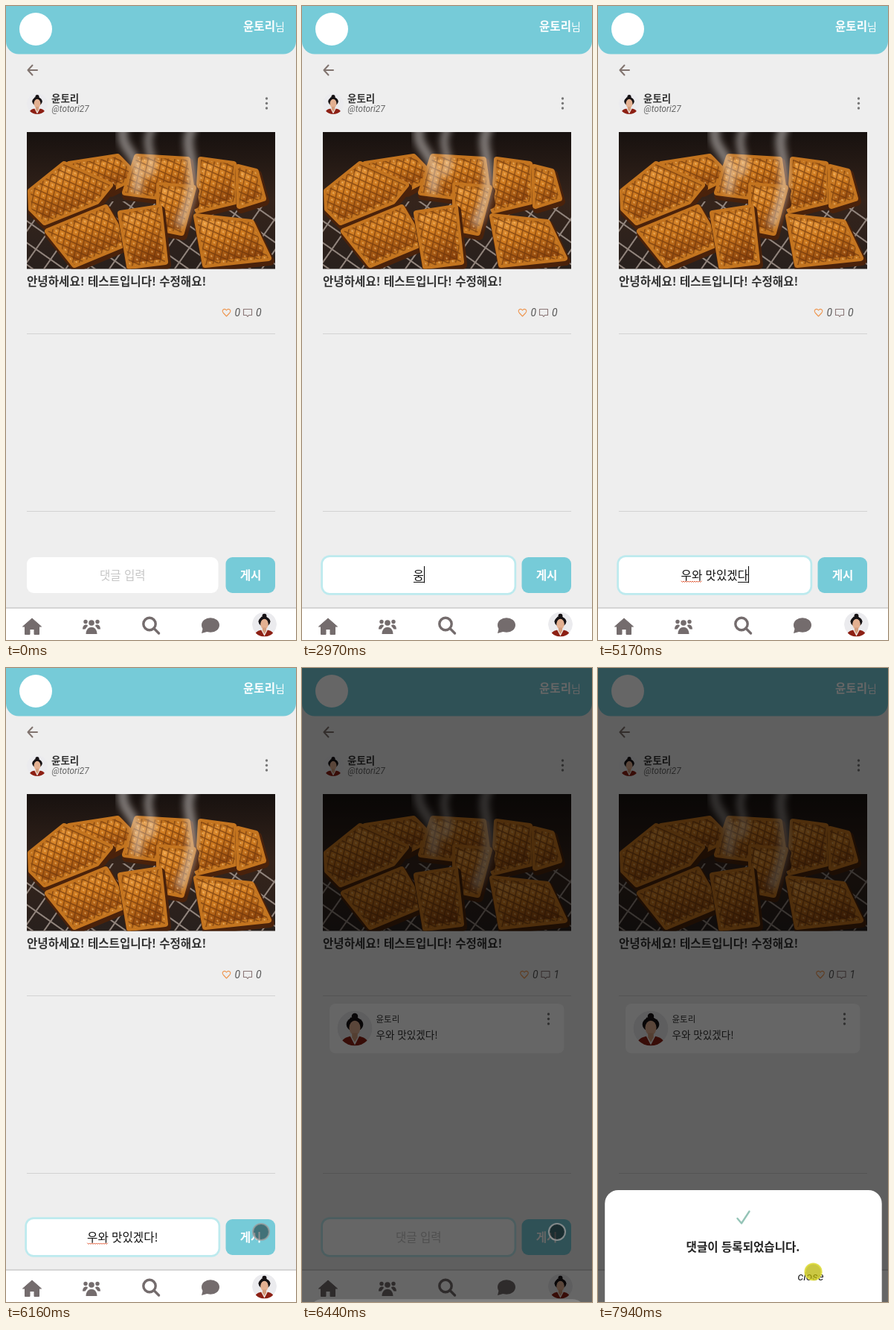
An HTML page that plays this animation: 390x850 px, repeating every 8000 ms.

```html
<!DOCTYPE html>
<html lang="ko">
<head>
<meta charset="utf-8">
<style>
  html, body { margin: 0; width: 100%; height: 100%; overflow: hidden; background: #eee; }
  svg { display: block; width: 100vw; height: 100vh; }
  text { font-family: "Noto Sans CJK KR", "Noto Sans CJK", sans-serif; font-size: 15.6px; fill: #333; white-space: pre; }
  .bold { font-weight: 700; }
  .semi { font-weight: 600; }
  .medium { font-weight: 500; }
  .slim { font-family: Roboto, sans-serif; font-style: italic; font-size: 14px; fill: #555; }
  .mid { text-anchor: middle; }
  .line { fill: none; stroke-linecap: round; stroke-linejoin: round; }
</style>
</head>
<body>
<svg viewBox="0 0 390 850">
  <defs>
    <clipPath id="photoClip"><rect x="28" y="169" width="334" height="183.5"/></clipPath>
    <clipPath id="roundClip"><circle r="50"/></clipPath>
    <linearGradient id="night" x2="0" y2="1">
      <stop stop-color="#17110f"/><stop offset=".5" stop-color="#35241b"/><stop offset="1" stop-color="#28201d"/>
    </linearGradient>
    <linearGradient id="meat" x2=".4" y2="1">
      <stop stop-color="#efa347"/><stop offset=".5" stop-color="#cf7a1e"/><stop offset="1" stop-color="#8b430c"/>
    </linearGradient>
    <pattern id="scores" width="9" height="9" patternUnits="userSpaceOnUse" patternTransform="rotate(24) skewX(12)">
      <path d="M0 0H9M0 0V9" stroke="#65300a" stroke-width="3"/>
      <circle cx="5.5" cy="5" r="1.1" fill="#ffd08a"/>
    </pattern>
    <pattern id="wires" width="24" height="24" patternUnits="userSpaceOnUse" patternTransform="rotate(35)">
      <path d="M0 4H24M4 0V24" stroke="#92857d" stroke-width="2"/>
    </pattern>
    <filter id="soft"><feGaussianBlur stdDeviation="5"/></filter>
    <g id="avatar" clip-path="url(#roundClip)">
      <circle r="50" fill="#ebebee"/>
      <circle cy="-34" r="9" fill="#161214"/>
      <ellipse cy="-11" rx="24" ry="20" fill="#161214"/>
      <ellipse cy="-1" rx="16" ry="21" fill="#e3b091"/>
      <path d="M-16-6C-14-20-4-22 2-25 10-20 16-16 16-6L24-12 8-31H-12L-24-12Z" fill="#161214"/>
      <path d="M-40 50C-38 28-24 26-10 22H10C24 26 38 28 40 50Z" fill="#8d2014"/>
      <path d="M-14 21L0 48 14 21Z" fill="#f4f0ee"/>
      <path d="M-8 14H8V26L0 40-8 26Z" fill="#d49d7d"/>
    </g>
    <g id="kebab" fill="#777">
      <circle cy="-6.5" r="1.7"/><circle r="1.7"/><circle cy="6.5" r="1.7"/>
    </g>
  </defs>

  <rect width="390" height="850" fill="#eee"/>

  <!-- header -->
  <rect y="-30" width="390" height="94.5" rx="17" fill="#76cbd8"/>
  <circle cx="40" cy="31" r="22" fill="#fff"/>
  <text class="bold" x="319" y="33" style="fill:#fff">윤토리<tspan style="font-size:14px;font-weight:400">님</tspan></text>

  <!-- post -->
  <path class="line" d="M42 86H30M35.500 79.500L29.500 86L35.500 92.500" stroke="#81746f" stroke-width="2"/>
  <use href="#avatar" transform="translate(42 131) scale(.28)"/>
  <text class="bold" x="61" y="129" style="font-size:13.5px">윤토리</text>
  <text class="slim" x="61.500" y="142" style="font-size:11.800px;fill:#666">@totori27</text>
  <use href="#kebab" x="350.500" y="130.500"/>
  <g clip-path="url(#photoClip)">
    <rect x="28" y="169" width="334" height="184" fill="url(#night)"/>
    <rect x="28" y="262" width="334" height="91" fill="url(#wires)"/>
    <g id="pieces" stroke-linejoin="round"></g>
    <g class="line" filter="url(#soft)" stroke="#e8e4e2" opacity=".5">
      <path d="M158 160C150 200 185 190 176 245" stroke-width="13"/>
      <path d="M198 160C180 190 205 200 192 225" stroke-width="10"/>
      <path d="M252 160C230 195 272 210 235 290" stroke-width="13"/>
    </g>
  </g>
  <text class="semi" x="28" y="374.500">안녕하세요! 테스트입니다! 수정해요!</text>
  <g id="counts">
    <path class="line" d="M296.500 416L292.300 411.500C289 407.500 294 404.500 296.500 408C299 404.500 304 407.500 300.700 411.500Z" stroke="#ee9650" stroke-width="1.100"/>
    <text class="slim" x="307.500" y="416">0</text>
    <path class="line" d="M319.500 406.500H330.500V414.500H326.500L325 416.500 323.500 414.500H319.500Z" stroke="#8b7777" stroke-width="1.100"/>
    <text class="slim" id="commentCount" x="336" y="416">0</text>
  </g>
  <path d="M28 439.500H362M28 677.500H362" stroke="#d2d2d2"/>

  <g id="comment">
    <rect x="37" y="450" width="315.500" height="66.500" rx="8" fill="#fff"/>
    <use href="#avatar" transform="translate(71 483) scale(.47)"/>
    <text class="medium" x="99.500" y="475" style="font-size:11.500px">윤토리</text>
    <text class="medium" x="99.500" y="497" style="font-size:13.600px">우와 맛있겠다!</text>
    <use href="#kebab" x="331.500" y="470.500"/>
  </g>

  <!-- comment form -->
  <rect id="ring" x="25.300" y="736.300" width="262.900" height="53.400" rx="12" fill="#bdeaee"/>
  <rect x="28" y="739" width="257.500" height="48" rx="9" fill="#fff"/>
  <rect id="outline" x="27.500" y="738.500" width="258.500" height="49" rx="9.500" fill="none" stroke="#333" stroke-width="1.200"/>
  <text id="hint" class="mid medium" x="156.800" y="768.500" style="fill:#c6c6c6">댓글 입력</text>
  <text id="typed" class="mid medium" x="156.800" y="768.500" style="fill:#111"></text>
  <path id="spelling" class="line" stroke="#e2552f" stroke-width="1"/>
  <rect id="composing" y="772" height="1" width="14" fill="#111"/>
  <rect id="caret" y="751" height="22.500" fill="#000"/>
  <rect x="295.500" y="739" width="66.500" height="48" rx="9" fill="#76cbd8"/>
  <text class="mid bold" x="329" y="768.500" style="fill:#fff">게시</text>

  <!-- bottom navigation -->
  <rect y="807" width="390" height="43" fill="#fff"/>
  <rect y="806" width="390" height="2" fill="#d5d5d5"/>
  <g fill="#746c6d">
    <path d="M35 821L47.500 832H44.500V842.500H38V835.500H32V842.500H25.500V832H22.500Z" stroke="#746c6d" stroke-linejoin="round"/>
    <circle cx="115" cy="827" r="3.800"/><circle cx="107" cy="825.500" r="2.700"/><circle cx="123" cy="825.500" r="2.700"/>
    <path d="M107.500 842C107.500 829.500 122.500 829.500 122.500 842ZM103 835.500C103 829 109 828.500 110 831L106.500 835.500ZM127 835.500C127 829 121 828.500 120 831L123.500 835.500Z"/>
    <g class="line" stroke="#746c6d" stroke-width="3.400"><circle cx="193" cy="828.500" r="8.200"/><path d="M199 834.500L205.500 841"/></g>
    <ellipse cx="275" cy="830" rx="12" ry="9.800"/><path d="M265 833L263 841 272 838.500Z"/>
  </g>
  <use href="#avatar" transform="translate(347.500 829) scale(.33)"/>

  <rect id="dim" width="390" height="850"/>

  <!-- confirmation sheet, drawn relative to its top edge -->
  <g id="sheet">
    <rect x="9.200" width="372.500" height="190" rx="18" fill="#fff"/>
    <path class="line" d="M187.500 38L193 44.500 203.500 28.500" stroke="#95c4b7" stroke-width="2.400"/>
    <text class="mid semi" x="195" y="82" style="fill:#222">댓글이 등록되었습니다.</text>
    <text class="slim" x="268.500" y="121" style="font-size:15.200px;fill:#222">close</text>
  </g>

  <circle id="pointer" r="11" stroke-width="2.200"/>
</svg>
<script>
const LOOP = 8000, FOCUS = 1530, SUBMIT = 6360, FIELD_CENTER = 156.8;
const el = id => document.getElementById(id);
const set = (id, attrs) => { for (const k in attrs) el(id).setAttribute(k, attrs[k]); };
const show = (id, on) => set(id, { visibility: on ? 'visible' : 'hidden' });
const ramp = (t, from, to) => Math.min(1, Math.max(0, (t - from) / (to - from)));
const smooth = u => u * u * (3 - 2 * u);

const pieces = [
  '85,212 150,202 175,228 140,246', '262,206 306,212 308,262 258,274',
  '312,216 336,222 346,258 314,268', '176,202 244,206 252,262 160,250',
  '33,248 78,212 140,240 122,262 52,290 34,272', '206,240 252,244 236,304 206,298',
  '56,302 134,270 162,318 92,347', '256,282 330,290 353,338 268,347',
  '154,278 206,270 214,343 166,349',
];
el('pieces').innerHTML = pieces.map(p =>
  `<polygon points="${p}" fill="#4a220b" stroke="#4a220b" stroke-width="12" transform="translate(2 4)"/>` +
  `<polygon points="${p}" fill="url(#meat)" stroke="#c3741f" stroke-width="8"/>` +
  `<polygon points="${p}" fill="url(#scores)" opacity=".65"/>`).join('');

const keys = [
  [2510, 'ㅇ'], [2840, '우'], [2970, '웅'], [3120, '우오'], [3220, '우와'], [3330, '우와 '],
  [3500, '우와 ㅁ'], [3830, '우와 마'], [3930, '우와 맛'], [4030, '우와 맛ㅇ'], [4240, '우와 맛이'],
  [4310, '우와 맛잇'], [4380, '우와 맛있'], [4580, '우와 맛있ㄱ'], [4680, '우와 맛있게'],
  [4780, '우와 맛있겟'], [4880, '우와 맛있겠'], [4970, '우와 맛있겠ㄷ'], [5070, '우와 맛있겠다'],
  [5660, '우와 맛있겠다!'],
];

// Each leg: start, end, from, to
const legs = [
  [200, 620, [278, 828], [187, 775]], [1020, 1220, [187, 775], [188, 767]],
  [1400, 1450, [188, 767], [191, 766]], [1760, 1761, [191, 766], [343, 756]],
  [7460, 7900, [343, 756], [289.5, 809.5]],
];
const visibleSpans = [[200, 1760], [4310, 4580], [5770, LOOP]];

function drawField(t) {
  const focused = t >= 1440, sent = t >= SUBMIT;
  const glow = ramp(t, 1600, 1830);
  set('ring', { opacity: glow });
  set('outline', { opacity: focused ? 1 - glow : 0 });

  const [keyTime, text] = sent ? [SUBMIT, ''] : keys.findLast(k => t >= k[0]) || [FOCUS, ''];
  if (el('typed').textContent !== text) el('typed').textContent = text;
  show('hint', !text);

  const width = text ? el('typed').getComputedTextLength() : 0;
  const left = FIELD_CENTER - width / 2, right = FIELD_CENTER + width / 2;
  const composing = /[^ !]$/.test(text);
  show('composing', composing);
  set('composing', { x: right - 14 });
  show('spelling', text.startsWith('우와 '));
  set('spelling', { d: `M${left + 0.5} 771` + 'l1.5 1.5 1.5-1.5'.repeat(9) });
  show('caret', t >= FOCUS && !sent && Math.floor((t - keyTime) / 500) % 2 === 0);
  set('caret', { x: right - (composing ? 0 : 0.8), width: composing ? 1 : 2 });
}

function drawPointer(t) {
  const [start, end, from, to] = legs.findLast(l => t >= l[0]) || legs[0];
  const u = smooth(ramp(t, start, end)), pressed = t >= 7910;
  show('pointer', visibleSpans.some(([a, b]) => t >= a && t < b));
  set('pointer', {
    cx: from[0] + (to[0] - from[0]) * u,
    cy: from[1] + (to[1] - from[1]) * u,
    fill: pressed ? 'rgba(184,180,0,.74)' : 'rgba(0,0,0,.44)',
    stroke: pressed ? 'rgba(222,220,60,.85)' : 'rgba(160,160,160,.75)',
  });
}

function drawResult(t) {
  const sent = t >= SUBMIT;
  show('comment', sent);
  el('commentCount').textContent = sent ? '1' : '0';
  set('counts', { transform: `translate(${sent ? 2.5 : 0} 0)` });
  set('dim', { opacity: sent ? 0.6 * ramp(t, 6320, 6440) : 0 });
  const rise = 1 - (1 - ramp(t, 6434, 6930)) ** 1.78;
  set('sheet', { transform: `translate(0 ${850 - 150 * rise})`, opacity: rise ** 0.45 });
}

function frame() {
  const t = performance.now() % LOOP;
  drawField(t);
  drawResult(t);
  drawPointer(t);
  requestAnimationFrame(frame);
}
frame();
</script>
</body>
</html>
```
